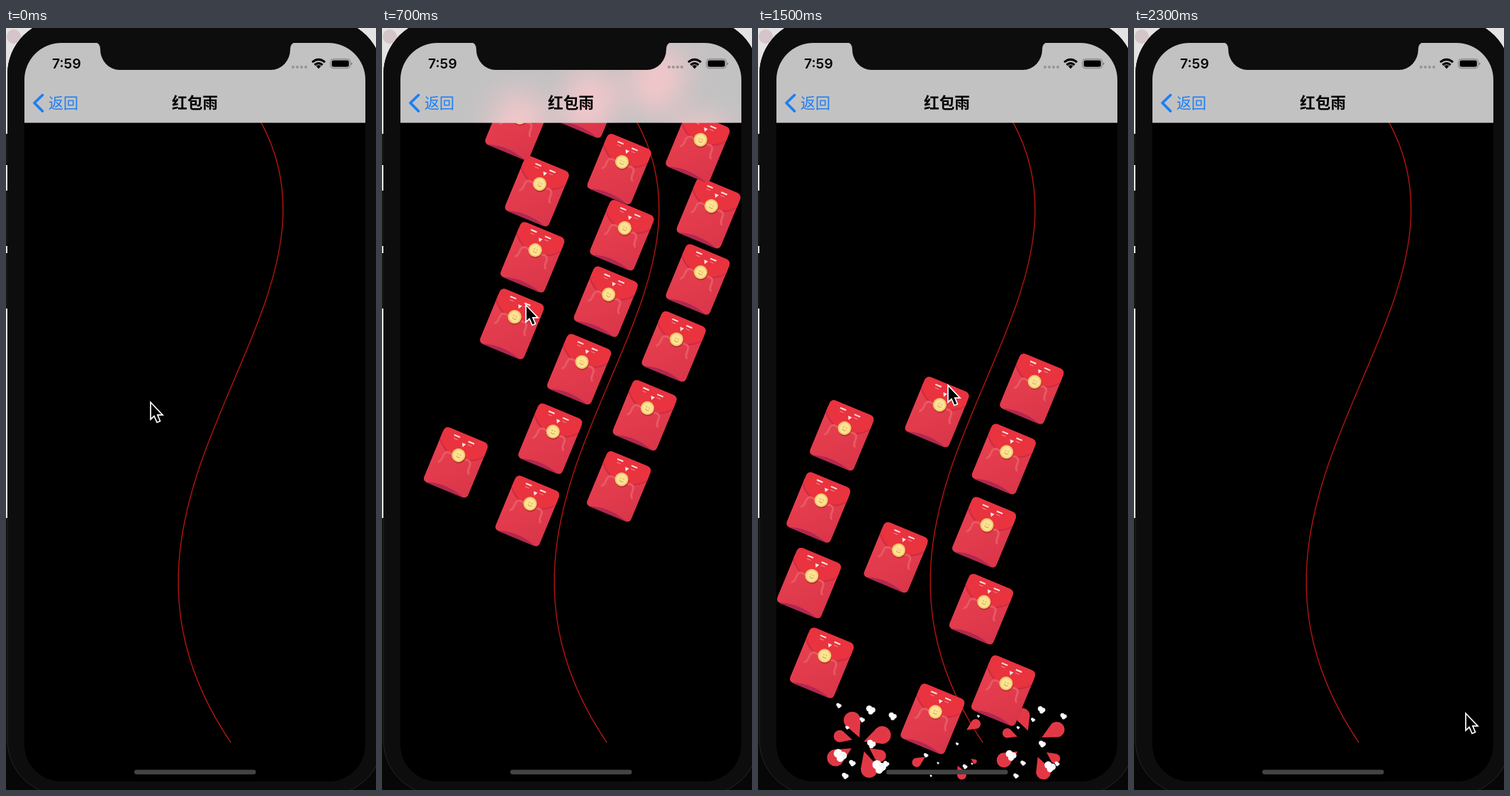
Animation, 522 px wide and 1073 px high, one loop 2400 ms. Source, as an HTML page with a canvas:

```html
<!DOCTYPE html>
<html lang="zh">
<head>
<meta charset="utf-8">
<style>
  html, body { margin: 0; width: 522px; height: 1073px; overflow: hidden; background: #000; }
  canvas, svg { position: absolute; left: 0; top: 0; display: block; }
  .clock { font: 600 19.3px Inter, sans-serif; }
  .back { font: 400 21px "Noto Sans CJK SC", "Noto Sans CJK", sans-serif; fill: #1b7ff3; }
  .title { font: 700 21.7px "Noto Sans CJK SC", "Noto Sans CJK", sans-serif; text-anchor: middle; }
</style>
</head>
<body>
<canvas id="stage" width="522" height="1073"></canvas>
<svg width="522" height="1073" viewBox="0 0 522 1073">
  <defs>
    <linearGradient id="desk" x1="0" y1="0" x2="0" y2="1073" gradientUnits="userSpaceOnUse">
      <stop offset=".643" stop-color="#e4e2e3"/>
      <stop offset=".643" stop-color="#080707"/>
    </linearGradient>
  </defs>

  <!-- desktop around the phone -->
  <path fill="url(#desk)" fill-rule="evenodd" d="M0 0H522V1073H0Z M79 -12H454A77 77 0 0 1 531 65V1003A77 77 0 0 1 454 1080H79A77 77 0 0 1 2 1003V65A77 77 0 0 1 79 -12Z"/>
  <circle cx="11" cy="12" r="10" fill="#d3c5c8"/>
  <path fill="#151414" d="M0 149h3v44H0zM0 229h3v78H0zM0 317h3v78H0z"/>

  <!-- phone body with the screen cut out -->
  <path fill="#0e0d0d" fill-rule="evenodd" d="M79 -12H454A77 77 0 0 1 531 65V1003A77 77 0 0 1 454 1080H79A77 77 0 0 1 2 1003V65A77 77 0 0 1 79 -12Z M78 21H455A52 52 0 0 1 507 73V1009A52 52 0 0 1 455 1061H78A52 52 0 0 1 26 1009V73A52 52 0 0 1 78 21Z"/>
  <path fill="none" stroke="#282626" d="M2 690V1003A77 77 0 0 0 79 1080M454 1080A77 77 0 0 0 531 1003"/>
  <path fill="#0e0d0d" d="M125 20Q133 21 133 30A27 29 0 0 0 160 59H374A27 29 0 0 0 401 30Q401 21 409 20Z"/>

  <!-- status bar -->
  <text class="clock" x="65" y="57">7:59</text>
  <g fill="#969596">
    <circle cx="405" cy="55" r="2.1"/><circle cx="411" cy="55" r="2.1"/>
    <circle cx="417" cy="55" r="2.1"/><circle cx="423" cy="55" r="2.1"/>
  </g>
  <g fill="none" stroke="#000" stroke-width="3">
    <path d="M432 48.2Q441 40.5 450 48.2"/>
    <path d="M435.4 52Q441 47.2 446.6 52"/>
  </g>
  <path d="M437.5 53.6Q441 51 444.5 53.6L441 57.4Z"/>
  <rect x="457.7" y="43.7" width="28" height="13" rx="4" fill="none" stroke="#777"/>
  <rect x="459.6" y="45.6" width="24.2" height="9.2" rx="2.4"/>
  <path fill="#777" d="M487 48q3 2.2 0 4.6z"/>

  <!-- navigation bar -->
  <path d="M51.5 94.5L40 105.5L51.5 117" fill="none" stroke="#1b7ff3" stroke-width="3.8" stroke-linecap="round" stroke-linejoin="round"/>
  <text class="back" x="60" y="113">返回</text>
  <text class="title" x="266.5" y="113.3">红包雨</text>

  <rect x="181" y="1044.5" width="171.5" height="6.5" rx="3.2" fill="#444"/>
  <path id="cursor" d="M0 0V24L5 19.5L9 28.5L13.5 26.5L9.8 17.8H17Z" fill="#000" stroke="#fff" stroke-width="1.7"/>
</svg>
<script>
const LOOP = 2400, STEP = 100;
const COUNT = 30, FIRST = -1.5, INTERVAL = 35, FALL = 970, BURST = 95, CLICK_LAG = 45;
const COLUMNS = [-171, -50, 70];
const TILT = Math.PI / 8;
// packet number -> time it is tapped
const TAPS = { 0: 370, 6: 580, 12: 785, 19: 1155, 25: 1365, 28: 1512 };
const POINTER = [[0, 204, 527], [300, 208, 389], [700, 203, 390], [800, 205, 391],
  [1100, 273, 495], [1200, 273, 495], [1500, 268, 503], [1600, 268, 505],
  [1900, 320, 896], [2300, 468, 965]];
// start x, y, radius, end x, y around the burst centre
const DROPS = [[-13, -30, 12, -15, -48], [28, -9, 12.5, 43, -30], [10, 37, 12, 23, 48],
  [-36, 21, 12, -45, 30], [-30, -8, 8.5, -42, -20], [25, 18, 8.5, 42, 29]];
// x, y, radius
const PUFFS = [[13, -46, 7], [44, -37, 6], [-30, 18, 10], [25, 34, 10.5], [-23, 47, 5],
  [1, -32, 4], [14, 2, 6.5], [-13, 29, 5], [-32, -52, 4], [-20, -21, 3], [35, 30, 4.5]];

const ctx = document.getElementById('stage').getContext('2d');
const cursor = document.getElementById('cursor');
const mix = (a, b, k) => a + (b - a) * k;

const bezier = (a, b, c, d, t) => {
  const u = 1 - t;
  return a * u * u * u + 3 * b * u * u * t + 3 * c * u * t * t + d * t * t * t;
};
const onPath = t => [bezier(317, 573, 61, 317, t), bezier(72, 365, 627, 1006, t)];

function fillPath(color, d) {
  ctx.fillStyle = color;
  ctx.fill(new Path2D(d));
}

function disc(x, y, r, color) {
  ctx.fillStyle = color;
  ctx.beginPath();
  ctx.arc(x, y, Math.max(r, 0), 0, Math.PI * 2);
  ctx.fill();
}

function tilted(x, y, draw) {
  ctx.save();
  ctx.translate(x, y);
  ctx.rotate(TILT);
  draw();
  ctx.restore();
}

function box() {
  ctx.beginPath();
  ctx.roundRect(-33.5, -42, 67, 84, 7);
}

const body = ctx.createLinearGradient(-33, -20, 33, 42);
body.addColorStop(0, '#e8404f');
body.addColorStop(1, '#d93549');

function packet() {
  box();
  ctx.fillStyle = '#b0284f';
  ctx.fill();
  fillPath(body, 'M-33.5 -30H33.5V36Q33 42 27 41Q0 32 -27 41Q-33 42 -33.5 36Z');
  fillPath('#cf2c42', 'M-33.5 -21Q-26 -11 -12 -7Q0 -2 12 -7Q26 -11 33.5 -21V-30H-33.5Z');
  fillPath('#e9333f', 'M-26 -42H26Q33.5 -42 33.5 -34V-24Q25 -13 11 -9Q0 -5 -11 -9Q-25 -13 -33.5 -24V-34Q-33.5 -42 -26 -42Z');
  ctx.strokeStyle = '#e85a63';
  ctx.lineWidth = 3;
  ctx.stroke(new Path2D('M-9 -8Q-20 -12 -20 -2T-24 8M9 -8Q20 -12 20 -2T24 8'));
  fillPath('#fbe6df', 'M-17 -36h9v2h-9zM5 -35h9v2h-9zM-2.5 -29h6l-3 5.5z');
  fillPath('#f08c8c', 'M-16 -31h6v1h-6zM6 -30h6v1h-6z');
  disc(0.6, -9.6, 9.8, '#b92a35');
  disc(-0.4, -10.8, 9.6, '#f3c868');
  disc(-0.4, -10.8, 7.6, '#fbe397');
  ctx.strokeStyle = '#e3ad55';
  ctx.lineWidth = 1.2;
  ctx.stroke(new Path2D('M-3 -12h2M1 -12h2M-3 -9Q0 -6 3 -9'));
}

function drop(x, y, r) {
  if (r <= 0) return;
  ctx.save();
  ctx.translate(x, y);
  ctx.rotate(Math.atan2(-y, -x));
  ctx.fillStyle = '#e23846';
  ctx.beginPath();
  ctx.arc(0, 0, r, Math.PI * 0.4, Math.PI * 1.6);
  ctx.quadraticCurveTo(r * 1.2, -r * 0.5, r * 2.2, 0);
  ctx.quadraticCurveTo(r * 1.2, r * 0.5, r * 0.31, r * 0.95);
  ctx.fill();
  ctx.restore();
}

function burst(x, y, age) {
  const p = age / BURST;
  ctx.save();
  ctx.translate(x, y);
  for (const [x0, y0, r, x1, y1] of DROPS) drop(mix(x0, x1, p), mix(y0, y1, p), r - 8.5 * p * p);
  for (const [px, py, r0] of PUFFS) {
    const r = r0 * (1 - p * p);
    disc(px - r * 0.3, py - r * 0.25, r * 0.62, '#fff');
    disc(px + r * 0.4, py + r * 0.05, r * 0.55, '#f4f4f4');
    disc(px, py + r * 0.45, r * 0.5, '#fff');
  }
  ctx.restore();
}

function navBar(packets) {
  ctx.save();
  ctx.beginPath();
  ctx.rect(26, 21, 481, 112.5);
  ctx.clip();
  ctx.fillStyle = '#c3c2c3';
  ctx.fillRect(26, 21, 481, 113);
  ctx.filter = 'blur(20px)';
  ctx.fillStyle = 'rgba(250, 200, 203, .9)';
  for (const [x, y] of packets) {
    if (y < 190) tilted(x, y, () => { box(); ctx.fill(); });
  }
  ctx.restore();
}

function movePointer(now) {
  const last = POINTER.length - 1;
  let i = 0;
  while (i < last - 1 && now > POINTER[i + 1][0]) i++;
  const [t0, x0, y0] = POINTER[i], [t1, x1, y1] = POINTER[i + 1];
  const k = Math.min(1, (now - t0) / (t1 - t0));
  cursor.setAttribute('transform', `translate(${mix(x0, x1, k)} ${mix(y0, y1, k)})`);
}

function render(now) {
  ctx.fillStyle = '#000';
  ctx.fillRect(0, 0, 522, 1073);
  ctx.strokeStyle = '#b3150f';
  ctx.lineWidth = 1.4;
  ctx.stroke(new Path2D('M317 72C573 365 61 627 317 1006'));

  const falling = [];
  for (let i = 0; i < COUNT; i++) {
    const start = FIRST + i * INTERVAL;
    if (now === 0 || now < start) break;
    const end = TAPS[i] ?? start + FALL;
    const place = time => {
      const [x, y] = onPath(Math.min(1, (time - start) / FALL));
      return [x + COLUMNS[i % 3], y];
    };
    if (now < end) {
      const spot = place(now);
      falling.push(spot);
      tilted(...spot, packet);
    } else if (now - end < BURST) {
      burst(...place(end + CLICK_LAG), now - end);
    }
  }
  navBar(falling);
  movePointer(now);
}

const began = performance.now();
let shown = -1;
function tick() {
  const now = Math.floor((performance.now() - began) % LOOP / STEP) * STEP;
  if (now !== shown) render(shown = now);
  requestAnimationFrame(tick);
}
tick();
</script>
</body>
</html>
```
